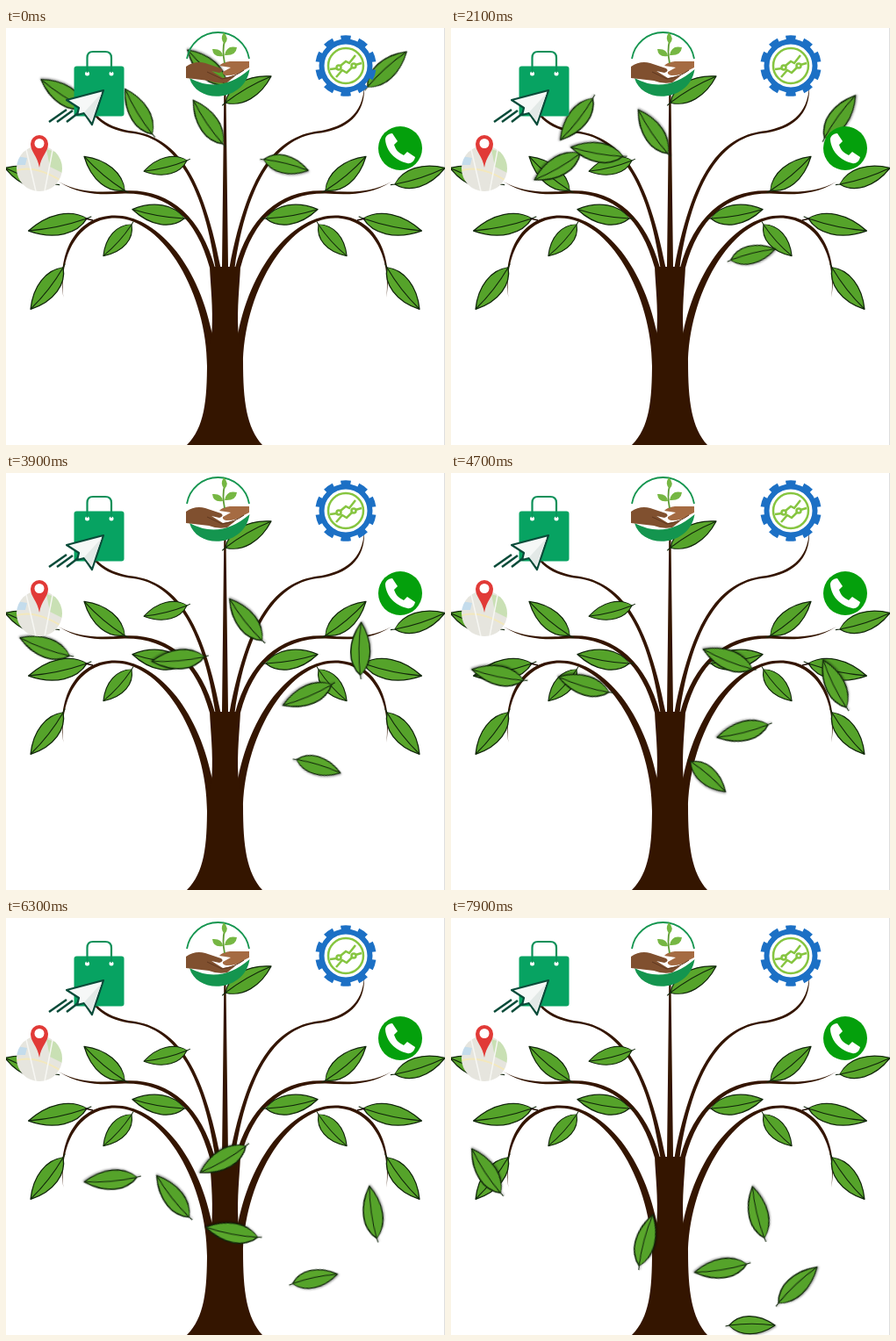
An HTML page without scripts for the animation above (8000 ms loop, 500 by 475 pixels).

```html
<!DOCTYPE html>
<html lang="en">
<head>
<meta charset="utf-8">
<title>Tree with falling leaves</title>
<style>
html, body { margin: 0; width: 100%; height: 100%; overflow: hidden; background: #fff; }
svg { display: block; width: 100vw; height: 100vh; }
.fall { animation: fall 8s infinite; filter: drop-shadow(1px 1px 1px #0006); }
.late { animation: fall 8s infinite, lift 8s steps(1) infinite; }

/* ten poses a second; every leaf brings its own waypoints */
@keyframes fall {
  0% { transform: var(--a); animation-timing-function: steps(8); }
  10% { transform: var(--b); animation-timing-function: steps(13); }
  26.25% { transform: var(--c); animation-timing-function: steps(18); }
  48.75% { transform: var(--d); animation-timing-function: steps(8); }
  58.75% { transform: var(--e); animation-timing-function: steps(8); }
  68.75% { transform: var(--f); animation-timing-function: steps(8); }
  78.75% { transform: var(--g); animation-timing-function: steps(16); }
  98.75%, 100% { transform: var(--h); }
}
/* leaves still on the tree cast no shadow */
@keyframes lift {
  0% { filter: none; }
  12.5%, 100% { filter: drop-shadow(1px 1px 1px #0006); }
}
#bagLeaf {
  --a: translate(65px,75px) rotate(213deg);
  --b: translate(57px,115px) rotate(188deg);
  --c: translate(121px,158px) rotate(150deg);
  --d: translate(44px,198px) rotate(200deg);
  --e: translate(53px,230px) rotate(192deg);
  --f: translate(94px,266px) rotate(183deg);
  --g: translate(119px,298px) rotate(175deg);
  --h: translate(40px,288px) rotate(237deg);
}
#sideLeaf {
  --a: translate(151px,95px) rotate(239deg);
  --b: translate(151px,95px) rotate(239deg);
  --c: translate(166px,141px) rotate(190deg);
  --d: translate(343px,253px) rotate(157deg);
  --e: translate(332px,294px) rotate(166deg);
  --f: translate(295px,328px) rotate(178deg);
  --g: translate(257px,358px) rotate(191deg);
  --h: translate(307px,399px) rotate(171deg);
}
#midLeaf {
  --a: translate(230px,107px) rotate(236deg);
  --b: translate(230px,107px) rotate(236deg);
  --c: translate(230px,118px) rotate(236deg);
  --d: translate(273px,167px) rotate(232deg);
  --e: translate(315px,212px) rotate(202deg);
  --f: translate(283px,246px) rotate(177deg);
  --g: translate(247px,275px) rotate(150deg);
  --h: translate(350px,335px) rotate(257deg);
}
#gearLeaf {
  --a: translate(434px,47px) rotate(-42deg);
  --b: translate(434px,47px) rotate(-42deg);
  --c: translate(443px,101px) rotate(-54deg);
  --d: translate(404px,200px) rotate(-89deg);
  --e: translate(437px,240px) rotate(-116deg);
  --f: translate(453px,288px) rotate(-107deg);
  --g: translate(418px,335px) rotate(-98deg);
  --h: translate(395px,418px) rotate(-43deg);
}
#rightLeaf {
  --a: translate(319px,156px) rotate(14deg);
  --b: translate(317px,164px) rotate(5deg);
  --c: translate(344px,258px) rotate(-14deg);
  --d: translate(356px,334px) rotate(17deg);
  --e: translate(293px,346px) rotate(41deg);
  --f: translate(320px,377px) rotate(14deg);
  --g: translate(352px,411px) rotate(-12deg);
  --h: translate(343px,464px) rotate(0deg);
}
#handLeaf {
  --a: translate(229px,45px) rotate(222deg);
  --b: translate(205px,76px) rotate(187deg);
  --c: translate(143px,104px) rotate(128deg);
  --d: translate(196px,212px) rotate(175deg);
  --e: translate(151px,241px) rotate(197deg);
  --f: translate(170px,280px) rotate(215deg);
  --g: translate(190px,317px) rotate(232deg);
  --h: translate(222px,367px) rotate(285deg);
}
</style>
</head>
<body>
<svg viewBox="0 0 500 475" preserveAspectRatio="none">
  <defs>
    <g id="leaf" stroke-linejoin="round">
      <path d="M0 0C12-14 36-16 60 0C38 14 14 14 0 0Z" fill="#5aa72c" stroke="#10250a" stroke-width="1.3"/>
      <path d="M0 0Q30-4 58 0C38 12 14 13 0 0Z" fill="#55a32a"/>
      <path d="M-5 1L0 0Q30-4 59 0" fill="none" stroke="#10250a" stroke-width="1.1"/>
    </g>
    <g id="blade"><use href="#leaf" x="-30"/></g>
    <g id="half">
      <g fill="#341500">
        <path d="M65.500 307C57 250 84 213.500 124 213.500C170 213.500 218 266 234.500 347L240 385H229C229 305 181 217 124 216.500C88 216.500 60 252 65.500 307Z"/>
        <path d="M60 175C85 189 110 187 135 185.500C186 183 222 215 238 273H232C217 217 185 188 135 188.500C110 190 85 191 60 175Z"/>
        <path d="M91 65C92 100 115 112 140 117C187 122 222 155 244.500 273H238.500C224 174 190 123 140 119.500C112 115 89 100 91 65Z"/>
      </g>
      <use href="#leaf" transform="translate(135 185) rotate(220)"/>
      <use href="#leaf" transform="translate(203 217) rotate(190)"/>
      <use href="#leaf" transform="translate(92 217) rotate(168) scale(1.13 1.05)"/>
      <use href="#leaf" transform="translate(143 224) rotate(132) scale(.8 .9)"/>
      <use href="#leaf" transform="translate(65 273) rotate(128)"/>
      <use href="#leaf" transform="translate(56 178) rotate(198)"/>
      <path d="M90 217l9 2" stroke="#1c0a00" stroke-width="1.3"/>
    </g>
  </defs>
  <rect width="500" height="475" fill="#fff"/>
  <path d="M499.500 0V475" stroke="#ddd"/>

  <use href="#half"/>
  <use href="#half" transform="translate(499) scale(-1 1)"/>
  <path d="M206 475C226 455 229 425 229 380L234.500 345C236 318 233 295 232 272H246L248.300 74H250.500L253 272H267C266 295 263 318 264.500 345L270 380C270 425 274 455 292 475Z" fill="#341500"/>
  <use href="#leaf" transform="translate(206 151) rotate(166) scale(.84 .88)"/>
  <use href="#leaf" transform="translate(250 85) rotate(-30)"/>

  <g class="fall" id="bagLeaf"><use href="#blade"/></g>
  <g class="fall late" id="sideLeaf"><use href="#blade"/></g>
  <g class="fall late" id="midLeaf"><use href="#blade"/></g>
  <g class="fall late" id="gearLeaf"><use href="#blade"/></g>
  <g class="fall" id="rightLeaf"><use href="#blade" transform="scale(.87 .92)"/></g>
  <g class="fall" id="handLeaf"><use href="#blade"/></g>

  <!-- map pin -->
  <clipPath id="disc"><circle cx="38" cy="160" r="26"/></clipPath>
  <g clip-path="url(#disc)">
    <rect x="10" y="132" width="56" height="56" fill="#e6e5de"/>
    <path d="M46 138L66 144V166L50 158Z" fill="#c9e0b4"/>
    <path d="M12 146L24 148L22 156L10 156Z" fill="#c4dcec"/>
    <path d="M10 163Q32 154 66 176" fill="none" stroke="#f3e8bd" stroke-width="2"/>
    <path d="M22 134L34 186M54 134L44 186" stroke="#f7f7f3" stroke-width="1.500"/>
  </g>
  <path d="M38 159C36 146 28 141 28 132A10 10 0 0 1 48 132C48 141 40 146 38 159Z" fill="#e13a37"/>
  <circle cx="38" cy="131.500" r="5.500" fill="#fff"/>

  <!-- shopping bag and pointer -->
  <path d="M92.500 52V34Q92.500 27 99 27H113Q120 27 120 34V52" fill="none" stroke="#0b9059" stroke-width="2.200"/>
  <rect x="77.500" y="43.500" width="57" height="57" rx="3" fill="#07a362"/>
  <circle cx="92.500" cy="52" r="2.500" fill="#fff"/>
  <circle cx="120" cy="52" r="2.500" fill="#fff"/>
  <path d="M92.500 44V51M120 44V51" stroke="#0b9059" stroke-width="1.500"/>
  <path d="M111 71L69 82L83 91L81 99L89 97L98 110Z" fill="#f6f8f7" stroke="#0a4b39" stroke-width="2.200" stroke-linejoin="round"/>
  <path d="M109 74L89 96L97 106Z" fill="#e3e9e7"/>
  <path d="M49 107L69 93M58 107L76 94M69 107L82 97" stroke="#0a4b39" stroke-width="2.500"/>

  <!-- sprout in hands -->
  <path d="M206 35A36 36 0 0 1 277 35" fill="none" stroke="#14954f" stroke-width="1.800"/>
  <path d="M209 57Q244 76 277.500 47C272 84 218 88 209 57Z" fill="#14954f"/>
  <path d="M205 44Q215 37 227 40L245 46Q249 49 243 51L234 49L247 57L262 54L252 62Q241 64 231 60L205 57Z" fill="#80502f"/>
  <path d="M277 38L255 38Q246 39 243 43L256 45L247 50Q246 53 251 54Q264 54 271 48L277 45Z" fill="#a56b42"/>
  <path d="M229 50L246 58Q260 56 271 48" fill="none" stroke="#5f371e"/>
  <path d="M249 40Q246 26 249 14" fill="none" stroke="#5e9b35" stroke-width="1.800"/>
  <path d="M249 18Q243 13 248 5Q255 12 249 18ZM247 32Q236 34 235 24Q246 23 247 32ZM249 31Q251 19 263 22Q262 32 249 31Z" fill="#76b743"/>

  <!-- gear with chart -->
  <circle cx="387" cy="43" r="28" fill="#fff"/>
  <g fill="none" stroke="#1c70c5">
    <circle cx="387" cy="43" r="27.500" stroke-width="6"/>
    <circle cx="387" cy="43" r="31.500" stroke-width="6.500" pathLength="20" stroke-dasharray="1.100 .9" stroke-dashoffset="-.45"/>
  </g>
  <g fill="none" stroke="#86c540" stroke-width="2.500">
    <circle cx="387" cy="43" r="20"/>
    <path d="M369 47L377 46M381 43L387 38L391 40L398 31M376 56L383 48L388 51L394 45M398 42L405 40"/>
    <circle cx="379" cy="45" r="2.500"/>
    <circle cx="396" cy="43" r="2.500"/>
  </g>

  <!-- phone -->
  <circle cx="449" cy="137" r="25" fill="#04a00c"/>
  <path d="M440 120l6 9-4 4c2 6 5 9 11 12l4-4 9 6c-1 5-5 8-9 7C443 151 433 140 432 127c0-4 4-7 8-7z" fill="#fff"/>
</svg>
</body>
</html>
```
